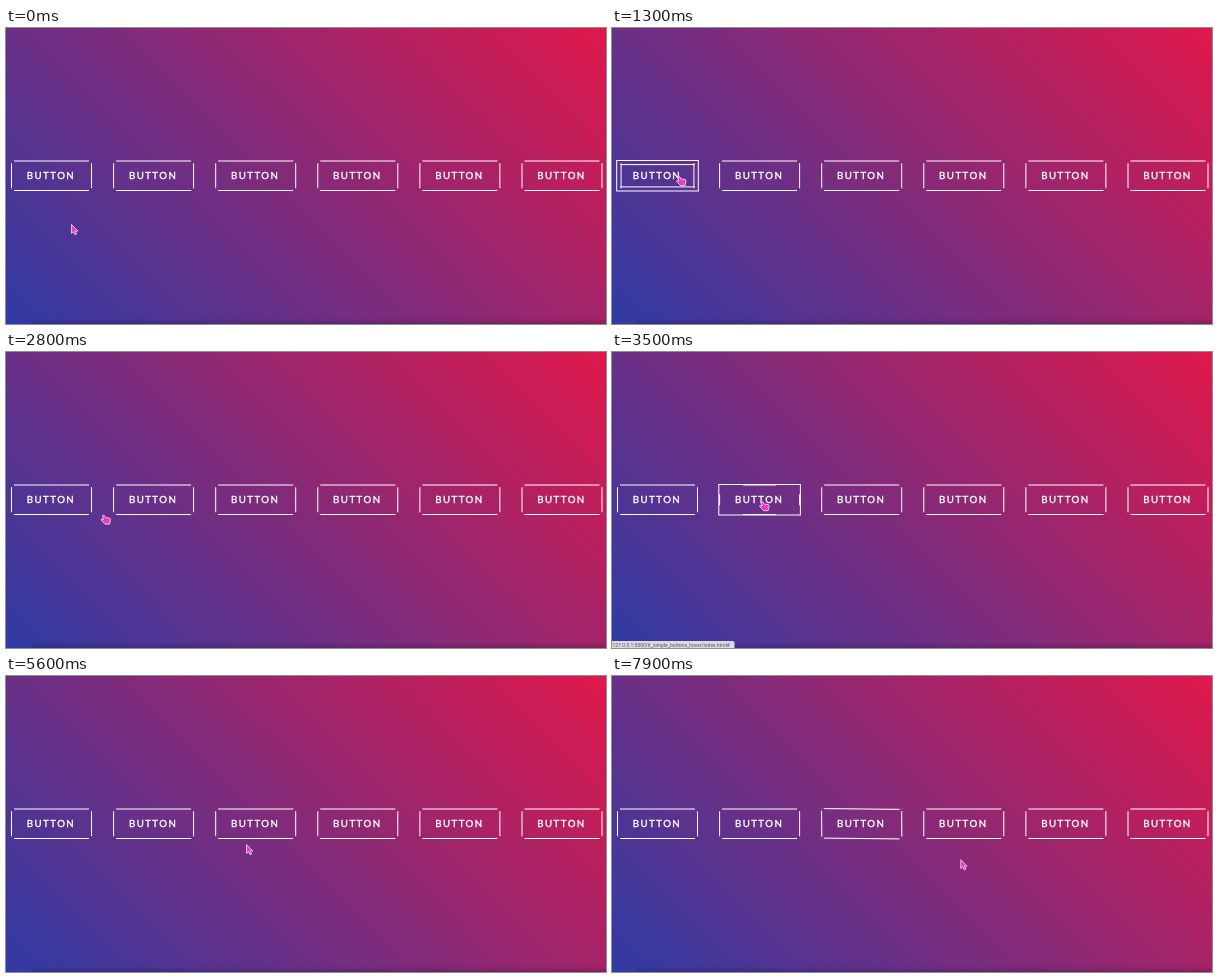
Recreate the animation shown at these times as an HTML page. Size 600 px wide and 296 px high, loop 8000 ms.

```html
<!DOCTYPE html>
<html lang="en">
<head>
<meta charset="utf-8">
<title>Button hover effects</title>
<style>
  html, body { margin: 0; height: 100%; overflow: hidden; }
  svg { display: block; width: 100vw; height: 100vh; background: linear-gradient(45deg, #2f3ba4, #df184b); }
  .label { font: 400 9.7px Lato, sans-serif; letter-spacing: 1.45px; fill: #fff; stroke: #fff; stroke-width: .35; }
  .line { fill: none; stroke: #fff; }
  #status text { font: 5px Roboto, sans-serif; fill: #55525c; }
  #cursor path { fill: #e040bd; stroke: #ffc4f2; stroke-width: .9; stroke-linejoin: round; }
</style>
</head>
<body>
<svg viewBox="0 0 600 296">
  <defs>
    <linearGradient id="shade" x2="0" y2="1">
      <stop stop-color="#201030" stop-opacity="0"/>
      <stop offset="1" stop-color="#201030" stop-opacity=".25"/>
    </linearGradient>
  </defs>
  <rect x="25" y="290" width="575" height="6" fill="url(#shade)"/>
  <g id="buttons"></g>
  <g id="status">
    <path d="M0 289H120.5Q122.5 289 122.5 291V296H0Z" fill="#dcdae0"/>
    <text x="0.5" y="294.6">127.0.0.1:5500/6_simple_buttons_hover/index.html#</text>
  </g>
  <g id="cursor">
    <path id="arrow" d="M.5 .5V9.5L2.6 7.7L4 10.8L5.6 10L4.2 7.1H6.8Z"/>
    <path id="hand" d="M0 2Q1 .9 2 2L3 4L7 4.4Q8.2 4.8 8 6L7 10.5H2.5L-1.6 6.4Q-1.4 5 0 5.6L.8 6Z"/>
  </g>
</svg>
<script>
const LOOP = 8000, FADE = 500, PITCH = 102.1;

// Each effect bends the resting lines: half lengths h and v, inset, slant
const HOVERS = [
  { start: 1150, end: 2300, effect: p => ({ inset: 7 * p }) },
  { start: 2800, end: 4700, effect: p => ({ h: 37.5 * (1 - .56 * p), v: 12.5 * (1 - .56 * p) }) },
  { start: 5700, end: 7500, effect: p => ({ h: 37.5 + 7 * p, v: 12.5 + 7.5 * p, slant: .268 * p }) }
];

// Pointer stops: time, x, y
const STOPS = [
  [0, 65, 196], [900, 65, 194], [1300, 66, 147], [2200, 65, 161], [2500, 72, 168],
  [3300, 149, 148], [4200, 150, 149], [5600, 240, 168], [6400, 251, 152], [7000, 252, 152], [LOOP, 351, 184]
];

const $ = id => document.getElementById(id);
const clamp = x => Math.max(0, Math.min(1, x));
const ease = x => 1 - (1 - clamp(x)) ** 2;
const smooth = x => x * x * (3 - 2 * x);

function linePath({ h = 37.5, v = 12.5, inset = 0, slant = 0 }) {
  return [-1, 1].map(side => {
    const x = side * (40 - inset), y = side * (14.75 - inset);
    return `M${-h} ${y - slant * h}L${h} ${y + slant * h}` +
           `M${x - slant * v} ${-v}L${x + slant * v} ${v}`;
  }).join('');
}

$('buttons').innerHTML = Array.from({ length: 6 }, (_, i) =>
  `<g transform="translate(${45.5 + PITCH * i} 147.75)">
    <rect class="line" x="-40.8" y="-15.25" width="81.6" height="30.5" opacity="0"/>
    <path class="line" d="${linePath({})}"/>
    <text class="label" x="-24.7" y="3.3">BUTTON</text>
  </g>`).join('');
const buttons = [...$('buttons').children];

function pointer(t) {
  const i = STOPS.findIndex(stop => stop[0] > t);
  const [t0, x0, y0] = STOPS[i - 1], [t1, x1, y1] = STOPS[i];
  const f = smooth((t - t0) / (t1 - t0));
  return [x0 + (x1 - x0) * f, y0 + (y1 - y0) * f];
}

function draw(now) {
  const t = now % LOOP;
  HOVERS.forEach(({ start, end, effect }, i) => {
    const p = ease((t - start) / FADE) - ease((t - end) / FADE);
    const [border, lines] = buttons[i].children;
    border.setAttribute('opacity', clamp(p * 2));
    lines.setAttribute('d', linePath(effect(p)));
  });
  const over = HOVERS.some(({ start, end }) => t >= start && t < end);
  $('arrow').style.display = over ? 'none' : '';
  $('hand').style.display = over ? '' : 'none';
  $('cursor').setAttribute('transform', `translate(${pointer(t)})`);
  $('status').setAttribute('opacity', Math.max(...HOVERS.map(({ start, end }) =>
    clamp((t - start - 200) / 100) * clamp((end + 250 - t) / 100))));
}

const begin = performance.now();
(function tick() {
  draw(performance.now() - begin);
  requestAnimationFrame(tick);
})();
</script>
</body>
</html>
```
